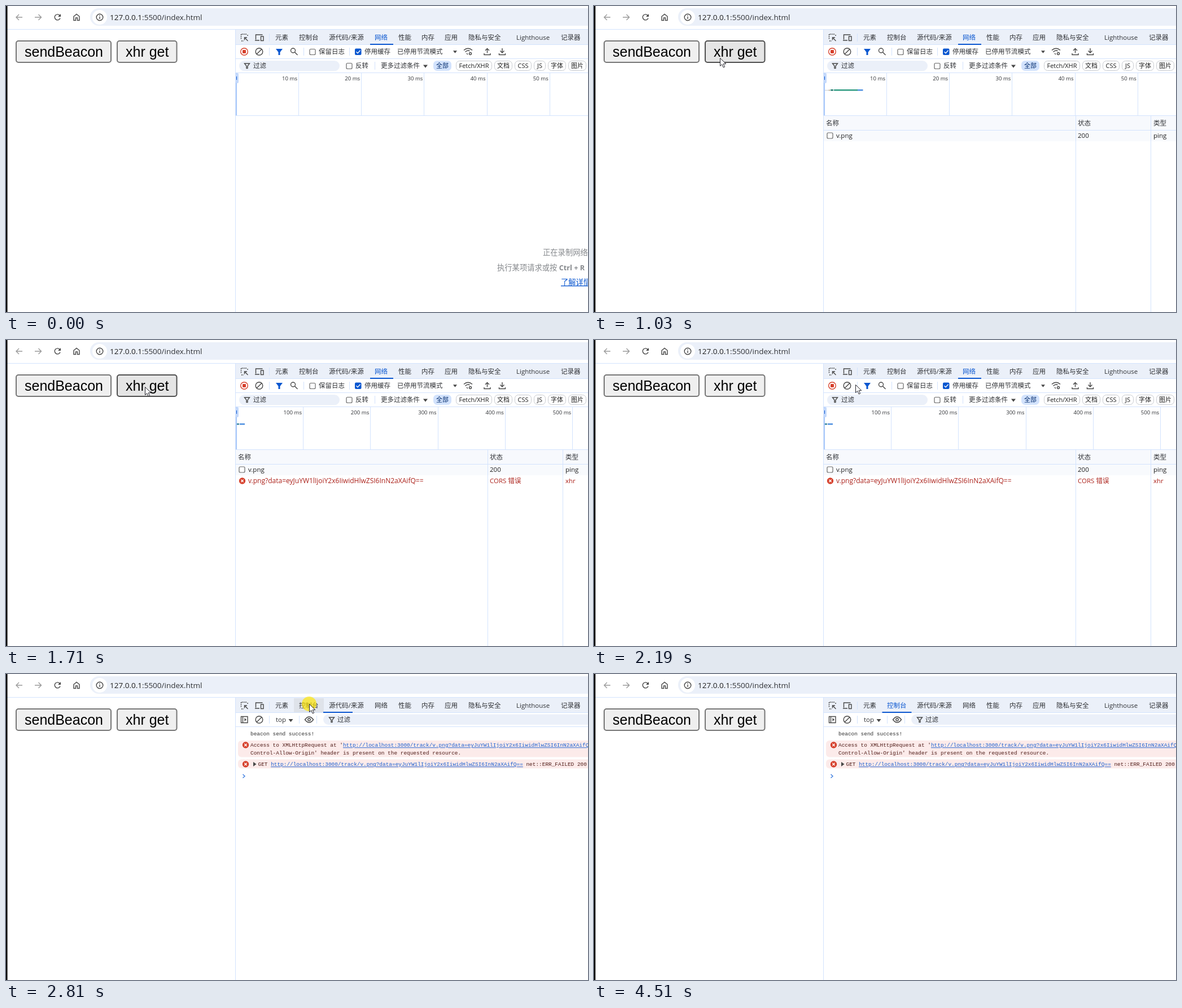
Write an HTML page that moves like this. It is 1031 px wide and 543 px high and loops after 4570 ms.

```html
<!DOCTYPE html>
<html lang="zh-CN">
<head>
<meta charset="utf-8">
<style>
html, body { margin: 0; width: 100%; height: 100%; overflow: hidden; background: #fff; }
svg { display: block; }
text { font: 11.5px 'Open Sans', 'Noto Sans CJK SC', 'Noto Sans CJK', sans-serif; fill: #303236; white-space: pre; }
.url { font-size: 13.5px; }
.btn { font: 25px 'Liberation Sans', sans-serif; fill: #000; }
.chip { font-size: 11px; text-anchor: middle; fill: #1f1f1f; }
.tick { font-size: 9.6px; text-anchor: end; }
.hint { font-size: 13.3px; fill: #85888c; }
.mono { font: 9.43px 'Liberation Mono', monospace; fill: #303030; }
.err { fill: #501d19; }
.link { fill: #1a5fd0; text-decoration: underline; }
.cell { fill: #1f1f1f; }
.bad { fill: #ac221b; }
.file { font-size: 12.03px; }
.ico { fill: none; stroke: #474747; stroke-width: 1.4; }
</style>
</head>
<body>
<svg id="stage" width="1031" height="543" viewBox="0 0 1031 543"></svg>
<script>
const BLUE = '#0b57d0', LINE = '#d3e3fd', BAR = '#ebf0f9', RED = '#d6402c';
const stage = document.getElementById('stage');

const rect = (x, y, w, h, fill, more = '') =>
  `<rect x="${x}" y="${y}" width="${w}" height="${h}" fill="${fill}" ${more}/>`;
const text = (x, y, s, cls = '', more = '') => `<text x="${x}" y="${y}" class="${cls}" ${more}>${s}</text>`;
const icon = (d, more = '') => `<path class="ico" d="${d}" ${more}/>`;
const solid = (d, fill = '#474747') => `<path d="${d}" fill="${fill}"/>`;
const group = (id, ...parts) => `<g id="${id}">${parts.join('')}</g>`;
const hline = (y, x = 407) => rect(x, y, 1031 - x, 1, LINE);
const seps = (y, ...xs) => xs.map(x => rect(x, y - 7, 1, 14, LINE)).join('');
const down = (x, y, r = 4) => solid(`M${x - r} ${y - r / 2}h${2 * r}l${-r} ${r * 1.3}z`);
const disc = (x, y, r, fill) => `<circle cx="${x}" cy="${y}" r="${r}" fill="${fill}"/>`;
const ring = (x, y, r, more = '') => `<circle class="ico" cx="${x}" cy="${y}" r="${r}" ${more}/>`;
const box = (x, y) => rect(x, y, 10, 10, '#fff', 'rx="2" stroke="#686868" stroke-width="1.2"');
const funnel = (x, y) => icon(`M${x - 4.5} ${y - 4}h9l-3.5 4.5v4h-2v-4z`);
const cross = (x, y) => disc(x, y, 5.7, RED) +
  icon(`M${x - 2.2} ${y - 2.2}l4.4 4.4m0 -4.4l-4.4 4.4`, 'style="stroke:#fff"');
const block = ring(448.5, 81, 6.3) + icon('M444 85.5l9 -9');

const tabs = [[477, '元素'], [519, '控制台'], [572, '源代码/来源'], [653, '网络'], [695, '性能'], [736, '内存'],
  [777, '应用'], [819, '隐私与安全'], [904, 'Lighthouse'], [983, '记录器']];
const chips = [[757, 32, '全部'], [797, 64, 'Fetch/XHR'], [865, 32, '文档'], [901, 30, 'CSS'], [935, 21, 'JS'],
  [960, 32, '字体'], [996, 32, '图片']];
const token = 'eyJuYW1lIjoiY2x6IiwidHlwZSI6InN2aXAifQ==';
const url = `<tspan class="link">http://localhost:3000/track/v.png?data=${token}</tspan>`;

const ticks = (x, gap, unit) => [0, 1, 2, 3, 4].map(i =>
  rect(Math.round(x + i * gap), 119, 1, 75, LINE) +
  text(x + i * gap - 2, 132, `${(i + 1) * unit} ms`, 'tick')).join('');
const button = (id, x, w, label) =>
  rect(x + 1, 62, w - 2, 38, '#efefef', `id="${id}" rx="4" stroke="#767676" stroke-width="2"`) +
  text(x + w / 2 + .5, 90, label, 'btn', 'text-anchor="middle"');

const browser = [
  rect(149, 4, 900, 31, BAR, 'rx="15.5"'), disc(166, 20, 13, '#fff'),
  icon('M29 20H18.5M23 15l-5 5 5 5', 'style="stroke:#9b9b9b"'),
  icon('M51 20h11M57.5 15l5 5 -5 5', 'style="stroke:#9b9b9b"'),
  icon('M95.5 17.2A5 5 0 1 0 96 21.5'), solid('M97 14v5h-5z'),
  icon('M120 18.5v7h3.5v-4.5h3v4.5h3.5v-7l-5 -4z'),
  ring(166, 20, 5.8), icon('M166 19v4M166 16.3v1.5'),
  text(184, 24.5, '<tspan fill="#1f1f1f">127.0.0.1</tspan>:5500/index.html', 'url'),
  hline(41, 0),
  button('beacon', 17, 170, 'sendBeacon'), button('xhr', 196, 107.5, 'xhr get')
];

const tabBar = [
  rect(407, 42, 624, 27, BAR), hline(68),
  rect(510, 43, 53, 25, '#dfe3ea', 'id="hover"'),
  icon('M426 50h-9.5v9.5M417 62h4M428 51v3', 'stroke-dasharray="2 1.2"'),
  icon('M428.5 62l-6 -6m0 4.5v-4.5h4.5'),
  icon('M442.5 59.5v-8.5h12M441 61h8'), icon('M451.5 54h4.5v7.5h-4.5z'),
  seps(56, 466),
  ...tabs.map(([x, s], i) => text(x, 59.7, s, '', `id="tab${i}"`)),
  rect(645, 67, 41, 2, BLUE, 'id="mark"')
];

const network = [
  ring(422, 81, 6.3, `style="stroke:${RED}"`), rect(419, 78, 6, 6, RED, 'rx="1"'), block, seps(81, 466, 527, 608),
  solid('M478 76h12l-4.5 6v5h-3v-5z', BLUE),
  ring(508.5, 79, 4), icon('M511.5 82l5 5'),
  box(538, 76.5), text(554, 85, '保留日志'),
  rect(618, 75.5, 11.5, 11.5, BLUE, 'rx="2"'), icon('M620.5 81.3l2.5 2.5 4.5 -5', 'style="stroke:#fff"'),
  text(635, 85, '停用缓存'), text(693, 85, '已停用节流模式'), down(795.5, 81, 3.5),
  icon('M811 78.5q7.5 -6.5 15 0M813.5 81.5q4.5 -4 8 -1.5M816 84l2 2'), ring(822.5, 84.5, 2),
  icon('M852.5 83.5v-8m-3.5 3.5l3.5 -3.5 3.5 3.5M847 84v2.5h11v-2.5'),
  icon('M879 75v8m-3.5 -3.5l3.5 3.5 3.5 -3.5M873.5 84v2.5h11v-2.5'),
  hline(93),
  rect(413, 97, 178, 18.5, BAR, 'rx="9.2"'), funnel(427, 106), text(438, 110.2, '过滤'),
  box(603, 101.5), text(619, 110.2, '反转'), seps(106, 653),
  text(664, 110.2, '更多过滤条件'), down(743, 106.5),
  ...chips.map(([x, w, s], i) =>
    rect(x + .5, 97.5, w - 1, 17, i ? '#fff' : LINE, `rx="6" stroke="${i ? '#c7cacf' : LINE}"`) +
    text(x + w / 2, 110, s, 'chip', i ? '' : 'style="fill:#062e6f"')),
  hline(118), hline(194),
  group('short', ticks(518, 111.2, 10)), group('long', ticks(526, 119.3, 100)),
  rect(407, 119, 2, 75, '#a8c7fa'), rect(407, 119, 5, 18, '#c4d9fb', 'rx="2"'), rect(408, 125, 1, 6, BLUE),
  group('empty',
    text(951, 442, '正在录制网络活动…', 'hint'),
    text(870, 468.5, '执行某项请求或按 <tspan font-weight="700" font-size="12.6">Ctrl + R</tspan>', 'hint'),
    text(983, 495, '了解详情', 'hint link', `style="fill:${BLUE}"`)),
  group('table',
    rect(407, 195, 624, 25, '#f7f9fd'), hline(220), rect(407, 221, 624, 19, '#f8fafd'),
    rect(853, 195, 1, 348, LINE), rect(986, 195, 1, 348, LINE),
    text(411, 211.5, '名称'), text(857, 211.5, '状态'), text(991, 211.5, '类型'),
    box(413, 225), text(429, 234, 'v.png', 'cell'), text(857, 234, '200', 'cell'), text(991, 234, 'ping', 'cell')),
  group('shortBars', rect(409, 149, 8, 1, '#c5cbd3'), rect(416, 148.5, 2, 2, '#b9a98a'),
    rect(419, 148, 5, 2.5, '#2b7f74'), rect(425, 148, 42, 2.5, '#2f9b81'), rect(467, 148, 9.5, 2.5, '#4d8fe0')),
  group('failed', rect(409, 148, 4, 2.5, '#34849c'), rect(414, 148, 9, 2.5, '#4d8fe0'),
    cross(418.5, 250), text(429, 254, 'v.png?data=' + token, 'bad file'),
    text(857, 254, 'CORS 错误', 'bad'), text(991, 254, 'xhr', 'bad'))
];

const consolePane = [
  rect(407, 69, 624, 474, '#fff'), hline(93),
  icon('M416.5 75.5h11.5v11h-11.5zM419.5 75.5v11'), solid('M422.5 78l3.5 3 -3.5 3z'),
  block, seps(81, 466, 519, 550), text(478, 85, 'top'), down(504.5, 82),
  icon('M529.5 81q7.5 -10 15 0q-7.5 10 -15 0z'), ring(537, 81, 2.2),
  rect(562, 71.5, 500, 18.5, BAR, 'rx="9.2"'), funnel(577, 81), text(587, 85, '过滤'),
  text(433, 109, 'beacon send success!', 'mono'),
  rect(411, 118, 640, 29.5, '#fcebea', 'rx="6"'), cross(424.5, 126),
  text(433, 129.3, `Access to XMLHttpRequest at '${url}'`, 'mono err'),
  text(433, 143.3, "Control-Allow-Origin' header is present on the requested resource.", 'mono err'),
  rect(411, 151.5, 640, 16, '#fcebea', 'rx="6"'), cross(424.5, 160), solid('M438 156v8l5.5 -4z'),
  text(446.5, 163.3, `GET ${url} net::ERR_FAILED 200`, 'mono err'),
  icon('M419.5 178l3.5 3.2 -3.5 3.2', 'style="stroke:#3f7fe0"'),
  rect(431, 177, 1, 12, '#1f1f1f', 'id="caret"')
];

stage.innerHTML = rect(0, 0, 1031, 543, '#fff') + browser.join('') + group('network', ...network) +
  group('console', ...consolePane) + group('tabBar', ...tabBar) + rect(406, 42, 1, 501, LINE) +
  rect(0, 0, 2.5, 543, '#000') +
  group('cursor', '<circle id="press" r="13" fill="#ffe600" opacity=".68"/>',
    '<path d="M.5 .5V14.5L3.8 11.5 6.2 17 8.6 16 6.2 10.7H10.8Z" fill="#fff" stroke="#26262e"/>');

const $ = id => document.getElementById(id);
const show = (id, on) => $(id).setAttribute('visibility', on ? 'inherit' : 'hidden');
const LOOP = 4570, STEP = 68.6;
// pointer path: step, x, y
const path = [[2, 705, 433], [9, 134, 90], [12, 134, 90], [15, 223, 92], [17, 239, 85], [19, 246, 83],
  [26, 246, 83], [34, 518, 78], [39, 537, 53], [42, 537, 53], [51, 1003, 463]];

function pointer(k) {
  const i = path.findIndex(p => p[0] > k);
  if (i < 1) return path[i ? path.length - 1 : 0].slice(1);
  const [a, b] = [path[i - 1], path[i]];
  const u = (k - a[0]) / (b[0] - a[0]);
  const e = (u + u * u * (3 - 2 * u)) / 2;
  return [a[1] + (b[1] - a[1]) * e, a[2] + (b[2] - a[2]) * e];
}

function paint(id, over, pressed) {
  const [fill, stroke] = !over ? ['#efefef', '#767676'] : pressed ? ['#f5f5f5', '#8d8d8d'] : ['#e5e5e5', '#4f4f4f'];
  $(id).setAttribute('fill', fill);
  $(id).setAttribute('stroke', stroke);
}

function draw(t) {
  const k = Math.floor((t + 8) / STEP);
  const [x, y] = pointer(k);
  const visible = k >= 2 && k < 52;
  const over = (l, top, r, bottom) => visible && x >= l && x < r && y >= top && y < bottom;
  const pressed = [10, 11, 23, 24, 41].includes(k);
  $('cursor').setAttribute('transform', `translate(${Math.round(x)} ${Math.round(y)})`);
  show('cursor', visible);
  show('press', visible && pressed);
  paint('beacon', over(17, 61, 187, 101), pressed);
  paint('xhr', over(196, 61, 304, 101), pressed);
  show('hover', over(510, 42, 563, 68));

  const sent = k >= 12, failed = k >= 25, inConsole = k >= 41, selected = k >= 42;
  show('network', !inConsole);
  show('console', inConsole);
  show('empty', !sent);
  show('table', sent);
  show('shortBars', sent && !failed);
  show('short', !failed);
  show('long', failed);
  show('failed', failed);
  $('tab3').style.fill = inConsole ? '' : BLUE;
  $('tab1').style.fill = selected ? BLUE : '';
  $('mark').setAttribute('x', selected ? 510.5 : inConsole ? 562 : 645);
  $('mark').setAttribute('width', inConsole ? 52 : 41);
  show('caret', selected && (t < 3575 || t >= 4110 && t < 4510));
}

function frame() {
  draw(performance.now() % LOOP);
  requestAnimationFrame(frame);
}
frame();
</script>
</body>
</html>
```
